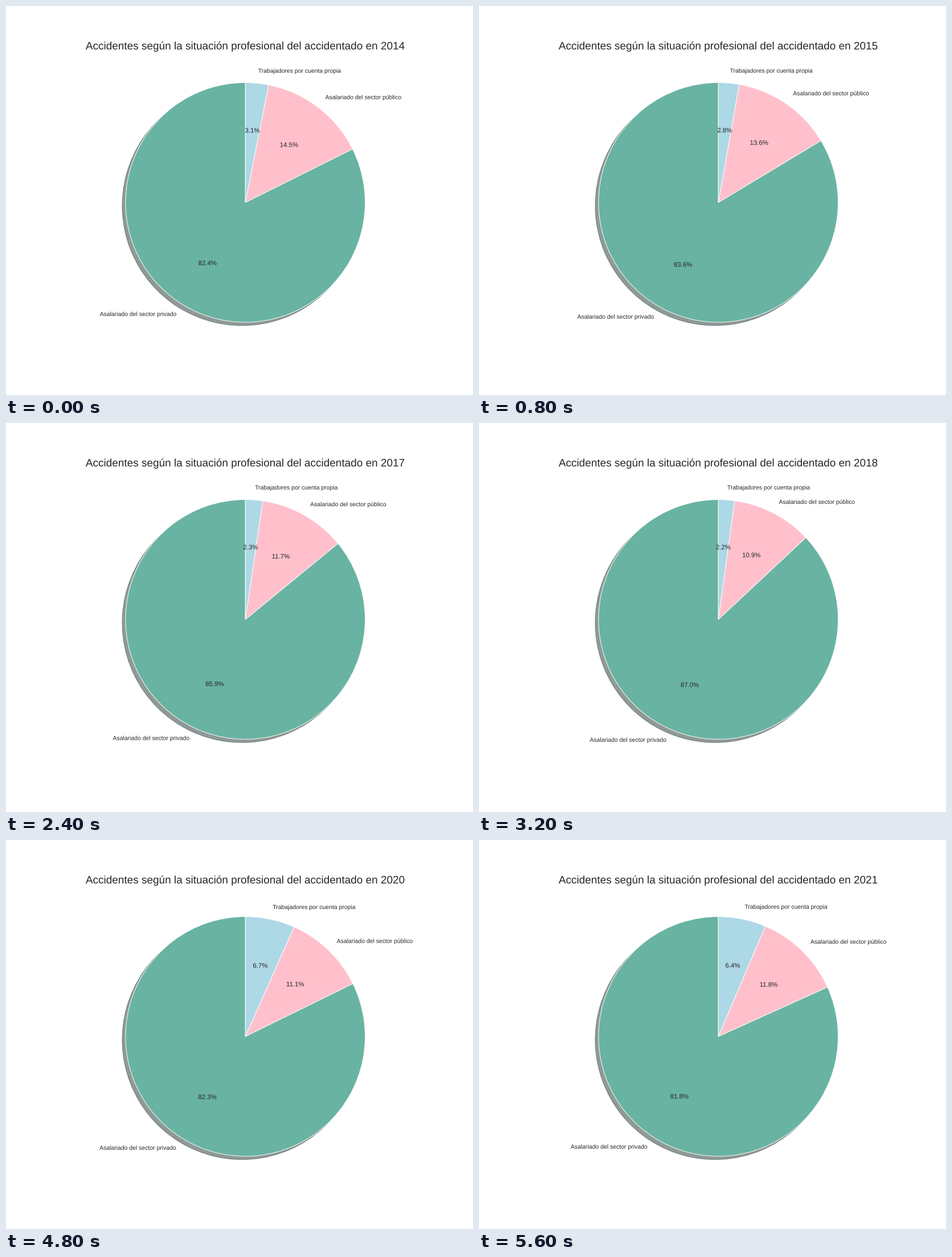
Recreate the animation shown at these times as a matplotlib script. Size 820 by 683 pixels, loop 6400 ms.

```python
import matplotlib.pyplot as plt
import numpy as np
from matplotlib.animation import FuncAnimation
from matplotlib.patheffects import Normal

W, H, DPI = 820, 683, 64
SCALE = W / 1200 * 100 / DPI  # type sizes below suit a 12-inch-wide chart
FIRST, LAST = 2014, 2021

plt.rcParams.update({
    "font.family": "Liberation Sans",
    "text.color": ".15",
    "text.hinting": "none",
    "path.effects": [Normal()],  # text as outlines, placed between pixels
    "xtick.labelsize": 11 * SCALE,
    "font.size": 12 * SCALE,
    "patch.linewidth": SCALE,
})

LABELS = [
    "Asalariado del sector privado",
    "Asalariado del sector público",
    "Trabajadores por cuenta propia",
]
COLORS = ["#69b3a2", "pink", "lightblue"]

# Percentages at key years; the years between follow a straight line
KEYS = [2014, 2016, 2018, 2019, 2020, 2021]
PUBLIC = [14.53, 12.62, 10.87, 9.02, 11.07, 11.84]
OWN = [3.11, 2.48, 2.16, 5.92, 6.66, 6.4]

fig, ax = plt.subplots(figsize=(W / DPI, H / DPI), dpi=DPI)
fig.subplots_adjust(left=0.125, right=0.9, bottom=0.11, top=0.88)
offset = -0.02 * 100 / DPI


def shares(year):
    public = np.interp(year, KEYS, PUBLIC)
    own = np.interp(year, KEYS, OWN)
    return [100 - public - own, public, own]


def draw(i):
    year = FIRST + i
    ax.clear()
    ax.pie(
        shares(year),
        labels=LABELS,
        colors=COLORS,
        autopct="%1.1f%%",
        startangle=90,
        shadow={"ox": offset, "oy": offset},
        wedgeprops={"edgecolor": "white"},
    )
    ax.set_title(
        f"Accidentes según la situación profesional del accidentado en {year}",
        fontsize=20 * SCALE,
        pad=6 * SCALE,
    )
    return []


anim = FuncAnimation(fig, draw, frames=LAST - FIRST + 1, interval=800,
                     repeat=True, repeat_delay=0)
plt.show()
```
